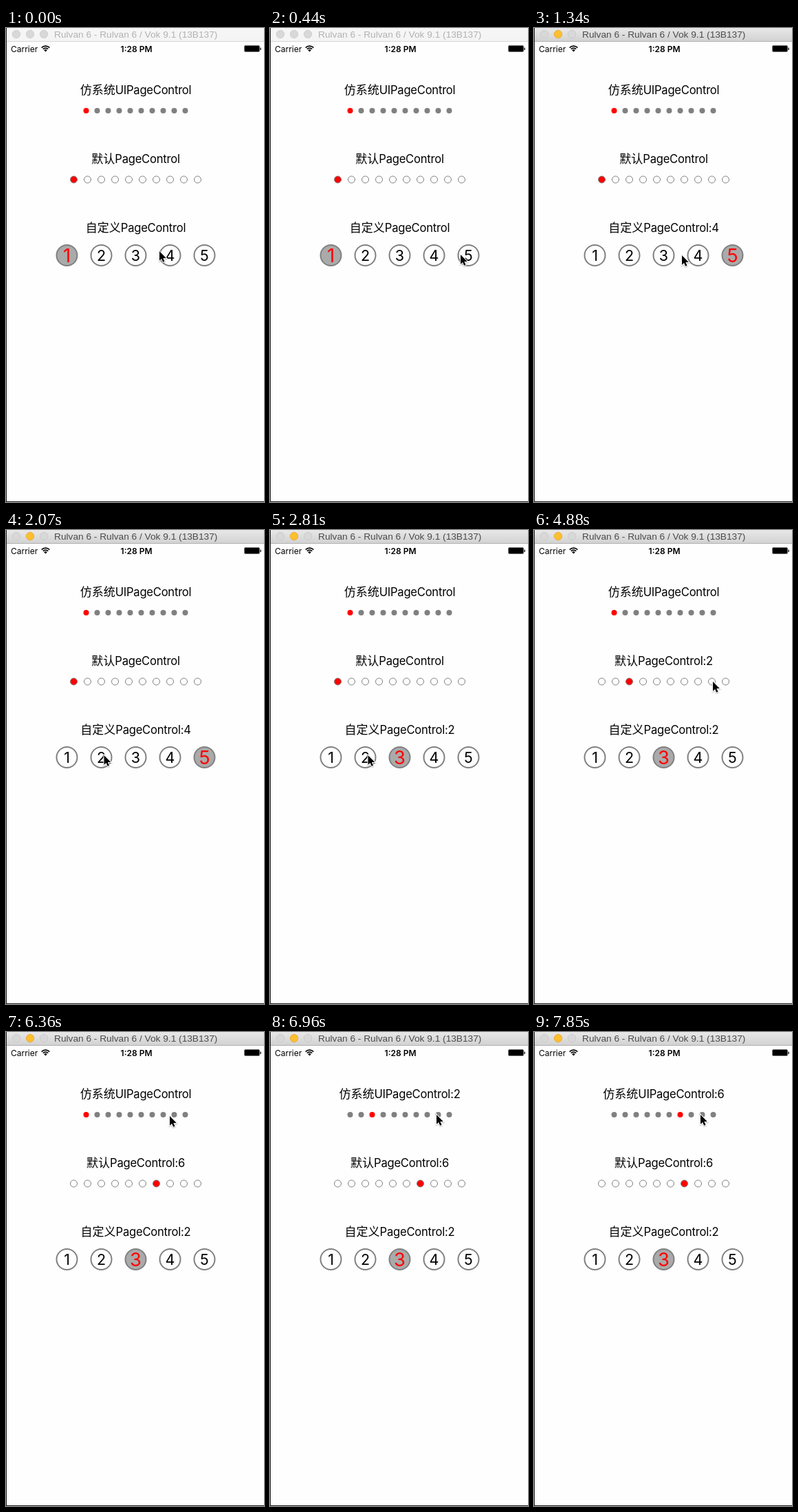
An HTML page with a canvas for the animation above (7990 ms loop, 375 px wide and 688 px high).

```html
<!DOCTYPE html>
<html lang="zh">
<head>
<meta charset="utf-8">
<title>PageControl</title>
<style>
  html, body { margin: 0; width: 100%; height: 100%; overflow: hidden; background: #fefefe; }
  canvas { display: block; width: 375px; height: 688px; }
</style>
</head>
<body>
<canvas id="stage"></canvas>
<script>
const W = 375, H = 688, LOOP = 7990, CENTER = 188.5;
const BEAT = 148, LEAD = 8; // the screen refreshes once per beat
const PAPER = '#fefefe', GRAY = '#808080', RED = '#f00';
const LATIN = 'Inter, "Open Sans", sans-serif';
const HAN = '"Noto Sans CJK SC", "Noto Sans CJK", sans-serif';
const TITLE = 'Rulvan 6 - Rulvan 6 / Vok 9.1 (13B137)';

const canvas = document.getElementById('stage');
const ctx = canvas.getContext('2d');
const ratio = window.devicePixelRatio || 1;
canvas.width = W * ratio;
canvas.height = H * ratio;

// Pointer strokes and clicks, timed in beats.
const home = { x: 223, y: 324 };
const strokes = [
  { from: 0, to: 3, x: 277, y: 329 },
  { from: 7, to: 9, x: 215, y: 330 },
  { from: 9, to: 14, x: 142.5, y: 327 },
  { from: 20, to: 27, x: 260, y: 220 },
  { from: 39, to: 43, x: 238, y: 122 },
  { from: 45, to: 46, x: 242, y: 120 }
];
const clicks = {
  custom: [5, 16, 19],
  standard: [31, 33, 35, 37, 38, 39],
  system: [45, 47, 49, 50, 52, 53]
};

const easeOut = p => Math.sin(p * Math.PI / 2);
const countBy = (beats, now) => beats.filter(b => b <= now).length;

function pointerAt(beat) {
  let { x, y } = home;
  for (const s of strokes) {
    const p = easeOut(Math.min(1, Math.max(0, (beat - s.from) / (s.to - s.from))));
    x += (s.x - x) * p;
    y += (s.y - y) * p;
  }
  return [Math.round(x * 2) / 2, Math.round(y)];
}

function rect(x, y, w, h, color) {
  ctx.fillStyle = color;
  ctx.fillRect(x, y, w, h);
}

function circle(x, y, r, fill, stroke, width = 1) {
  ctx.beginPath();
  ctx.arc(x, y, r, 0, Math.PI * 2);
  ctx.fillStyle = fill;
  ctx.fill();
  if (!stroke) return;
  ctx.strokeStyle = stroke;
  ctx.lineWidth = width;
  ctx.stroke();
}

function text(str, x, y, font, color = '#000', align = 'left') {
  ctx.font = font;
  ctx.fillStyle = color;
  ctx.textAlign = align;
  ctx.fillText(str, x, y);
}

function titleBar(active) {
  const shade = ctx.createLinearGradient(0, 0, 0, 19);
  shade.addColorStop(0, active ? '#e8e8e8' : '#f6f6f6');
  shade.addColorStop(1, active ? '#d2d2d2' : '#f4f4f4');
  rect(0, 0, W, 19, shade);
  rect(0, 19, W, 1, active ? '#b1b1b1' : '#d6d6d6');
  for (let i = 0; i < 3; i++) {
    const lit = active && i === 1;
    circle(15 + i * 20, 9, 5.7, lit ? '#fdbe2e' : '#d8d8d8', lit ? '#e0a32a' : '#c4c4c4', 0.7);
  }
  text(TITLE, 70, 14, '13.7px "Liberation Sans", sans-serif', active ? '#4b4b4b' : '#b2b2b2');
}

function statusBar() {
  text('Carrier', 7, 34.5, `12px ${LATIN}`);
  text('1:28 PM', 189.5, 34.5, `600 12px ${LATIN}`, '#000', 'center');

  const fan = r => {
    ctx.beginPath();
    ctx.arc(57.5, 34.4, r, -Math.PI * 0.75, -Math.PI * 0.25);
  };
  ctx.strokeStyle = '#000';
  ctx.lineWidth = 1.7;
  for (const r of [5.2, 8.2]) {
    fan(r);
    ctx.stroke();
  }
  fan(3.2);
  ctx.lineTo(57.5, 34.4);
  ctx.fill();

  ctx.strokeStyle = 'rgba(0,0,0,0.55)';
  ctx.lineWidth = 1;
  ctx.beginPath();
  ctx.roundRect(346.5, 25.5, 22, 9, 1.5);
  ctx.stroke();
  rect(347, 26, 21, 8, '#000');
  rect(369.4, 28.6, 1.3, 3.4, '#000');
}

function label(han, name, page, y) {
  const latin = name + (page ? ':' + page : '');
  const latinFont = `16.6px ${LATIN}`;
  const hanWidth = han.length * 17;
  ctx.letterSpacing = '-0.24px';
  ctx.font = latinFont;
  const x = CENTER - (hanWidth + ctx.measureText(latin).width) / 2;
  text(latin, x + hanWidth, y, latinFont);
  ctx.letterSpacing = '0px';
  text(han, x, y, `17px ${HAN}`);
}

// Calls back with the index and centre of each item in a centred row.
function row(count, gap, paint) {
  for (let i = 0; i < count; i++) paint(i, CENTER + (i - (count - 1) / 2) * gap);
}

function systemControl(page) {
  label('仿系统', 'UIPageControl', page, 96);
  row(10, 16, (i, x) => circle(x, 120, 4, i === page ? RED : GRAY));
}

function standardControl(page) {
  label('默认', 'PageControl', page, 196);
  row(10, 20, (i, x) => circle(x, 220, 5, i === page ? RED : PAPER, GRAY));
}

function customControl(taps) {
  const page = taps ? 5 - taps : 0;
  label('自定义', 'PageControl', page, 296);
  row(5, 50, (i, x) => {
    const on = i === page;
    circle(x, 330, 15, on ? '#aaa' : PAPER, GRAY, 2);
    text(i + 1, x, on ? 340 : 338, `${on ? 27.3 : 21.5}px ${LATIN}`, on ? RED : '#000', 'center');
  });
}

function arrow(x, y) {
  ctx.save();
  ctx.translate(x, y);
  const shape = new Path2D('M0 0V13.8L3.1 10.9L5.2 15.8L7.5 14.8L5.4 10H9.8Z');
  ctx.strokeStyle = '#fff';
  ctx.lineWidth = 2;
  ctx.shadowColor = 'rgba(0,0,0,0.35)';
  ctx.shadowBlur = 1.5 * ratio;
  ctx.shadowOffsetY = 0.7 * ratio;
  ctx.stroke(shape);
  ctx.shadowColor = 'transparent';
  ctx.fillStyle = '#000';
  ctx.fill(shape);
  ctx.restore();
}

function draw(t) {
  const beat = Math.floor((t + LEAD) / BEAT);
  const taps = countBy(clicks.custom, beat);
  ctx.setTransform(ratio, 0, 0, ratio, 0, 0);
  rect(0, 0, W, H, PAPER);
  titleBar(taps > 0);
  statusBar();
  systemControl(countBy(clicks.system, beat));
  standardControl(countBy(clicks.standard, beat));
  customControl(taps);
  rect(0, 0, 1, H, '#1c1c1c');
  rect(0, H - 1, W, 1, '#1c1c1c');
  arrow(...pointerAt(beat));
}

const start = performance.now();
function tick() {
  draw((performance.now() - start) % LOOP);
  requestAnimationFrame(tick);
}
tick();
</script>
</body>
</html>
```
